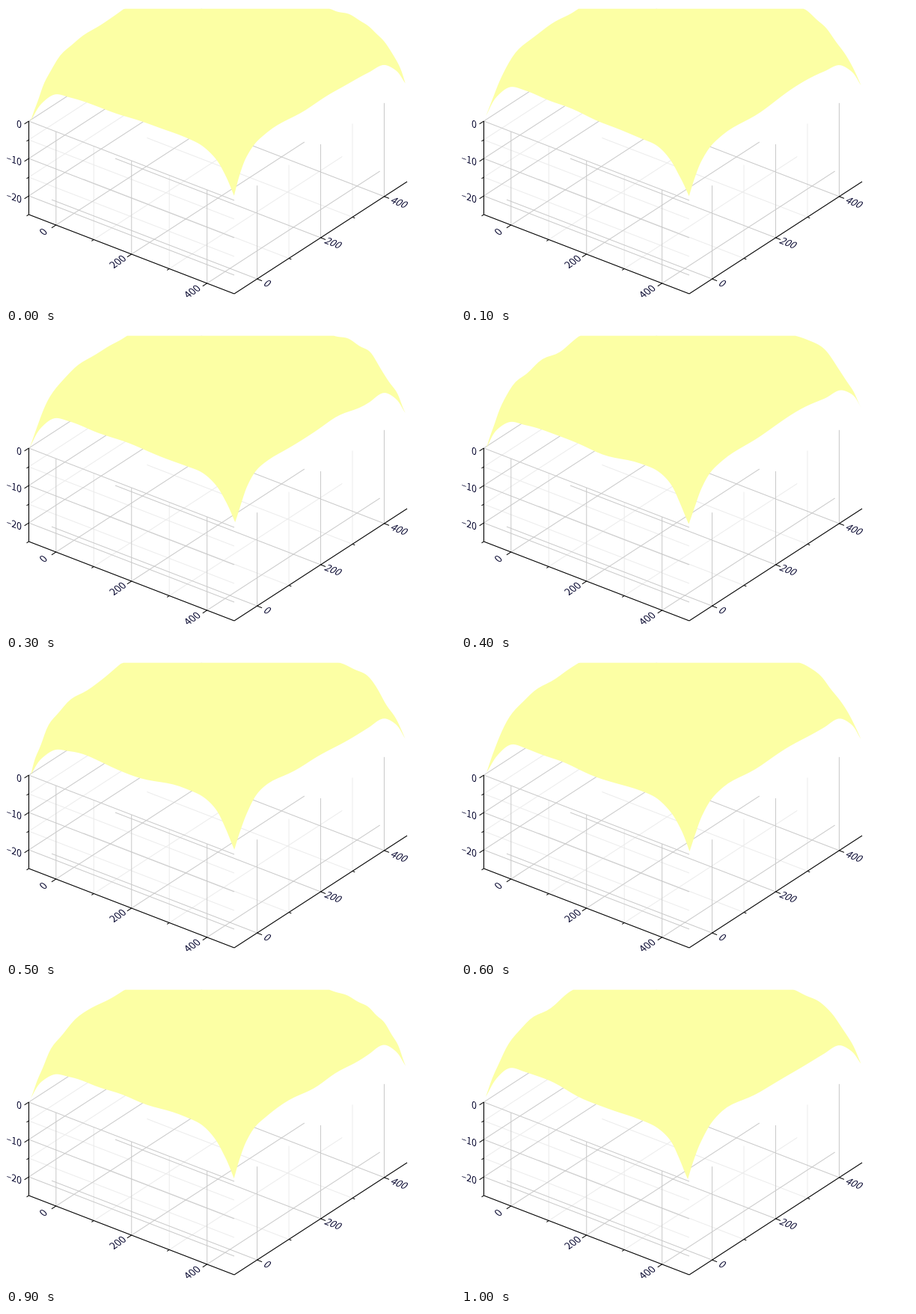
Write a matplotlib script that moves like this. It is 600x400 px and loops after 1.1 s.

```python
import numpy as np
import matplotlib.pyplot as plt
from matplotlib.animation import FuncAnimation
from matplotlib.patches import PathPatch, Polygon
from matplotlib.textpath import TextPath
from matplotlib.transforms import Affine2D

W, H, DPI = 600, 400, 100
FRAMES, STEP, SEED = 11, 100, 7
LO, HI, DEPTH, TOP = -72, 472, 25, 3.7
MAJOR, MINOR, INK = "#c9c9c9", "#ececec", "#0a0a32"

# Screen vectors of the box
ORIGIN = np.array([30.5, 154])
EX, EY, EZ = np.array([[274.5, 106], [231, -150], [0, 125]])

# Resting outline of the dome, edge by edge
FRONT = [(33, 153), (48, 129), (66, 117), (85, 121), (125, 135), (180, 157),
         (240, 177), (262, 187), (280, 204), (293, 227), (305, 256)]
SIDE = [(305, 256), (313, 231), (322, 207), (335, 185), (350, 171),
        (400, 142), (440, 115), (485, 90), (507, 79), (521, 86), (534, 106)]
RIGHT = [(534, 106), (522, 78), (510, 59), (495, 38), (478, 20), (460, 10),
         (441, 4), (420, -2)]
LEFT = [(175, -8), (157, 4), (132, 21), (92, 48), (60, 85), (42, 126),
        (33, 153)]


def smooth(points, n=8):
    """Cubic Hermite curve through the points."""
    p = np.array(points, float)
    t = np.r_[0, np.cumsum(np.hypot(*np.diff(p, axis=0).T))]
    m = np.gradient(p, t, axis=0)
    s = np.linspace(0, 1, n)[:, None]
    h = np.diff(t)
    return np.vstack([
        (1 + 2 * s) * (1 - s) ** 2 * p[i] + s * (1 - s) ** 2 * h[i] * m[i]
        + s**2 * (3 - 2 * s) * p[i + 1] + s**2 * (s - 1) * h[i] * m[i + 1]
        for i in range(len(h))
    ])


EDGES = [smooth(e) for e in (FRONT, SIDE, RIGHT, LEFT)]


def ripple(edge, start, end, rng):
    """Shift the edge with its corners and add random standing waves."""
    steps = np.hypot(*np.diff(edge, axis=0).T)
    s = np.r_[0, np.cumsum(steps)][:, None] / steps.sum()
    out = edge + (1 - s) * start + s * end
    k = np.arange(2, 12)
    out[:, 1] += np.sin(np.pi * k * s) @ (rng.normal(0, 3, k.size) / k)
    return out


def outline(frame):
    rng = np.random.default_rng([SEED, frame])
    left, front, right = rng.normal(0, (0.8, 2.5), (3, 2))
    ends = [(left, front), (front, right), (right, 0), (0, left)]
    pts = np.vstack([ripple(e, *c, rng) for e, c in zip(EDGES, ends)])
    pts[:, 1] = np.maximum(pts[:, 1], TOP)
    return pts


fig = plt.figure(figsize=(W / DPI, H / DPI), dpi=DPI, facecolor="white")
ax = fig.add_axes([0, 0, 1, 1])
ax.set(xlim=(0, W), ylim=(H, 0))
ax.axis("off")


def frac(v):
    return (v - LO) / (HI - LO)


def pos(u, v, w):
    return ORIGIN + u * EX + v * EY + w * EZ


def line(a, b, color="black", z=1, lw=1.0):
    ax.plot(*zip(a, b), color=color, lw=lw * 72 / DPI, zorder=z,
            solid_capstyle="butt", snap=False)


def label(text, x, y, base, up, ha=0.5):
    path = TextPath((0, 0), text, size=13, prop={"family": "Noto Sans CJK JP"})
    box = path.get_extents()
    move = Affine2D().translate(-box.x0 - ha * box.width,
                                -box.y0 - box.height / 2)
    skew = Affine2D([[base[0], up[0], x], [base[1], up[1], y], [0, 0, 1]])
    ax.add_patch(PathPatch((move + skew).transform_path(path),
                           fc=INK, lw=0, zorder=5))


def grid(values, z_values, color, z):
    for f in map(frac, values):
        line(pos(f, 0, 0), pos(f, 0, 1), color, z)
        line(pos(f, 0, 1), pos(f, 1, 1), color, z)
        line(pos(1, f, 0), pos(1, f, 1), color, z)
        line(pos(0, f, 1), pos(1, f, 1), color, z)
    for w in z_values:
        line(pos(0, 0, w / DEPTH), pos(1, 0, w / DEPTH), color, z)
        line(pos(0, 0, w / DEPTH), pos(0, 1, w / DEPTH), color, z)


def ticks(values, z_values, size):
    out_x = EX / np.hypot(*EX) * size
    out_y = -EY / np.hypot(*EY) * size
    for f in map(frac, values):
        for p, d in ((pos(f, 0, 1), out_y), (pos(1, f, 1), out_x)):
            line(p, p + d, z=4)
    for w in z_values:
        p = pos(0, 0, w / DEPTH)
        line(p, p + out_y, z=4)


grid([100, 300], [5, 15], MINOR, 1)
grid([0, 200, 400], [0, 10, 20], MAJOR, 2)
ticks([100, 300], [5, 15, 25], 3.5)
ticks([0, 200, 400], [0, 10, 20], 7)
for a, b in (((0, 0, 0), (0, 0, 1)), ((0, 0, 1), (1, 0, 1)),
             ((1, 0, 1), (1, 1, 1))):
    line(pos(*a), pos(*b), z=4, lw=1.1)

# Tick labels lie in the planes of the box
for v in (0, 200, 400):
    x, y = pos(frac(v), 0, 1) + (-17 - v / 130, 9 + v / 200)
    label(str(v), x, y, (0.82, -0.57), (-0.75, -0.7))
    x, y = pos(1, frac(v), 1) + (14 + v / 65, 6 + v / 200)
    label(str(v), x, y, (0.93, 0.37), (0.68, -0.78))
for v in (0, 10, 20):
    text = f"–{v}" if v else "0"
    label(text, 20.3, 159 + 5 * v, (0.94, 0.33), (0.04, -1), ha=1)

surface = ax.add_patch(Polygon(outline(0), closed=True, fc="#fcffa4", lw=0,
                               zorder=3))


def draw(frame):
    surface.set_xy(outline(frame))
    return (surface,)


anim = FuncAnimation(fig, draw, frames=FRAMES, interval=STEP, repeat=True,
                     repeat_delay=0)
plt.show()
```
